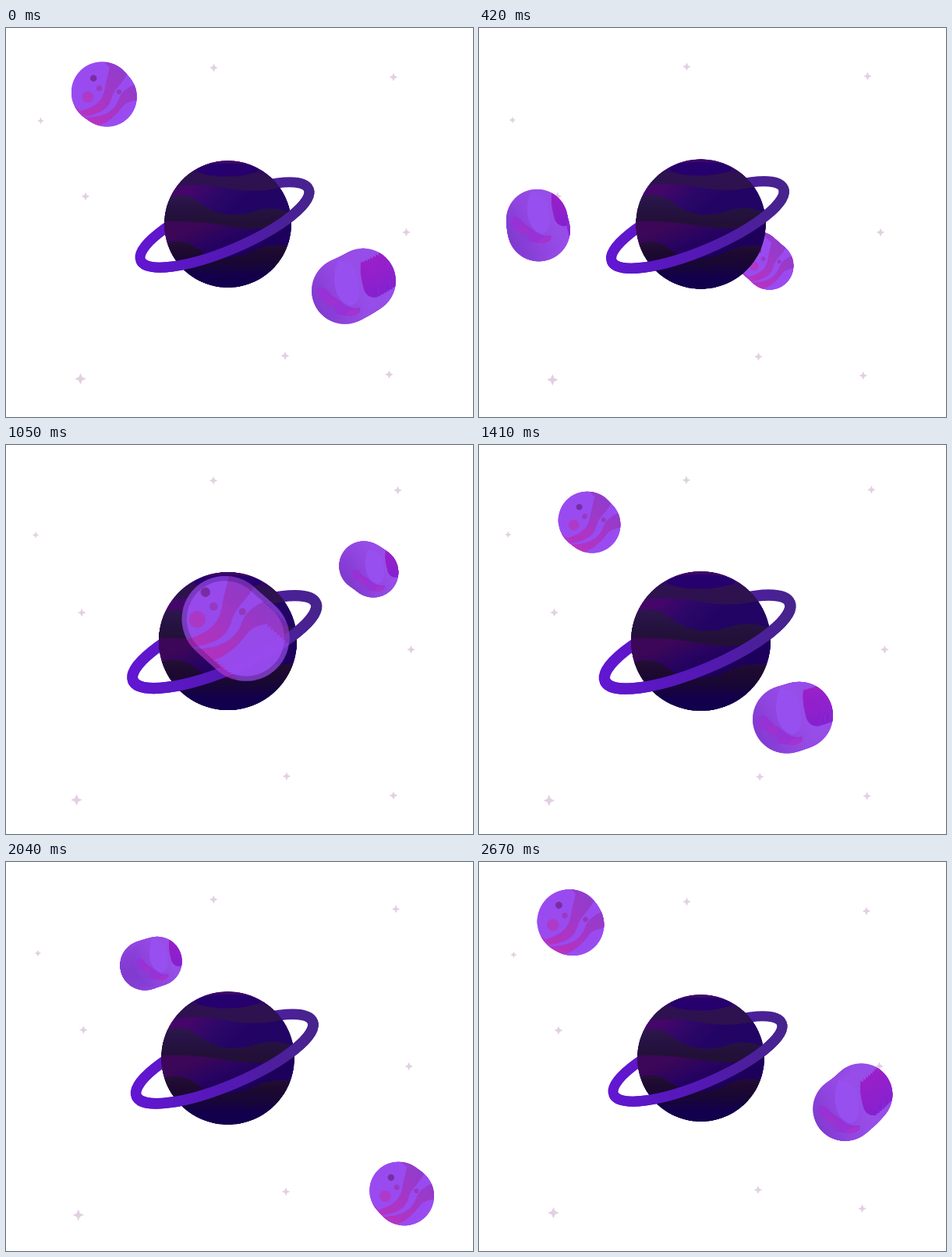
Animation of 599 by 499 pixels, one loop 2.7 s. Source, as an HTML page with a canvas:

```html
<!DOCTYPE html>
<html lang="en">
<head>
<meta charset="utf-8">
<title>Orbiting moons</title>
<style>
  html, body { margin: 0; width: 100%; height: 100%; overflow: hidden; background: #fff; }
  canvas { display: block; width: 599px; height: 499px; }
</style>
</head>
<body>
<canvas id="stage" width="599" height="499"></canvas>
<script>
const W = 599, H = 499, LOOP = 2700, ORBIT = 1350, STEP = 30;
const CX = 284.5, CY = 251.5, RADIUS = 81.9;
const SHUTTER = 21, COPIES = 8;
const RAD = Math.PI / 180;
const ctx = document.getElementById('stage').getContext('2d');

function layer(w, h) {
  const c = document.createElement('canvas');
  c.width = w;
  c.height = h;
  return c.getContext('2d');
}

// Sprite of a unit disc, painted in coordinates from -1 to 1.
function disc(size, paint) {
  const g = layer(size, size);
  g.translate(size / 2, size / 2);
  g.scale(size / 2, size / 2);
  g.beginPath();
  g.arc(0, 0, 0.995, 0, 7);
  g.clip();
  paint(g);
  return g.canvas;
}

function blob(g, color, x, y, rx, ry = rx, turn = 0) {
  g.fillStyle = color;
  g.beginPath();
  g.ellipse(x, y, rx, ry, turn, 0, 7);
  g.fill();
}

function shape(g, fill, path) {
  g.fillStyle = fill;
  g.fill(new Path2D(path));
}

function gradient(g, x0, y0, x1, y1, ...colors) {
  const grad = g.createLinearGradient(x0, y0, x1, y1);
  colors.forEach((c, i) => grad.addColorStop(i / (colors.length - 1), c));
  return grad;
}

function fillFrom(g, y, fill) {
  g.fillStyle = fill;
  g.fillRect(-1, y, 2, 2);
}

const planet = disc(400, g => {
  fillFrom(g, -1, gradient(g, 0, -1, 0, -0.7, '#40086a', '#2c0860'));
  blob(g, '#26006c', 0, -0.85, 0.48, 0.1);
  shape(g, '#2d124f', 'M-1 -.72 Q-.6 -.85 -.4 -.78 Q0 -.68 .4 -.8 Q.6 -.82 1 -.65 V0 H-1Z');
  shape(g, gradient(g, -0.5, -0.62, 0, -0.1, '#45066a', '#2c0868', '#220464'),
    'M-1 -.56 Q-.5 -.66 0 -.56 T1 -.62 V0 H-1Z');
  shape(g, gradient(g, 0, -0.42, 0, 0.02, '#2c164c', '#251240', '#221036'),
    'M-1 -.38 C-.75 -.5 -.6 -.46 -.45 -.34 C-.2 -.14 .1 -.1 .4 -.2 C.65 -.28 .8 -.24 1 -.18 V.1 H-1Z');
  shape(g, gradient(g, -0.2, -0.06, 0, 0.45, '#3c0758', '#2a0462', '#1d005c'),
    'M-1 -.04 Q-.5 -.06 0 .03 T1 0 V1 H-1Z');
  shape(g, gradient(g, 0, 0.25, 0, 1, '#251038', '#1e0a30', '#180736', '#13004c', '#13004e'),
    'M-1 .32 C-.75 .22 -.6 .28 -.45 .4 C-.2 .58 .15 .55 .4 .42 C.6 .32 .8 .32 1 .34 V1 H-1Z');
});

const striped = disc(160, g => {
  fillFrom(g, -1, '#9b4cf0');
  const stripe = gradient(g, -0.7, 0.8, 0.7, -0.7, '#b934c2', '#a638c8', '#923ccc');
  shape(g, stripe, 'M.1 -1.1 C.05 -.75 0 -.65 -.05 -.4 C-.1 -.1 -.15 .3 -.95 .48' +
    ' L-.78 .66 C-.1 .55 .05 .35 .15 .05 C.25 -.3 .45 -.35 .7 -.8 L.6 -1.1Z');
  shape(g, stripe, 'M1.1 -.5 C.75 -.35 .5 -.2 .4 .05 C.25 .5 -.1 .68 -.8 .7' +
    ' L-.4 1 C.1 .85 .3 .6 .5 .35 C.65 .15 .8 .15 1.1 .08Z');
  blob(g, '#7c2da6', -0.45, -0.62, 0.11);
  blob(g, '#9a3bc4', -0.26, -0.29, 0.095);
  blob(g, '#b03ac8', -0.64, 0.01, 0.19);
  blob(g, '#943ab8', 0.4, -0.17, 0.08);
});

const cloudy = disc(160, g => {
  fillFrom(g, -1, gradient(g, -0.9, 0.5, 0.4, -0.2, '#813bd0', '#9146e0', '#984ee8'));
  shape(g, '#9734d6', 'M-.85 -.05 C-.6 -.25 -.5 .1 -.3 .2 C-.1 .3 .1 .6 .45 .5' +
    ' C.5 .7 .2 .8 -.1 .72 C-.5 .7 -.8 .4 -.85 -.05Z');
  blob(g, '#8a3cd6', -0.5, 0.5, 0.3, 0.14, 0.7);
  blob(g, '#a132cf', -0.42, 0.32, 0.17, 0.11, 0.4);
  blob(g, '#a436d0', 0.25, 0.65, 0.22, 0.09, -0.3);
  shape(g, '#9a50f0', 'M-.2 -.9 Q.35 -.9 .4 -.2 Q.5 .3 .2 .45 Q-.1 .4 -.25 .05 Q-.4 -.4 -.2 -.9Z');
  shape(g, gradient(g, 0.4, -0.8, 0.9, 0.3, '#9c20c8', '#8422d2'),
    'M.5 -1 C.42 -.55 .5 -.35 .55 -.1 C.62 .2 .85 .25 1.1 .15 V-1Z');
});

// Smooth periodic curve through [time, angle] keys; one turn per ORBIT.
function curve(keys) {
  const n = keys.length;
  const key = i => {
    const turn = Math.floor(i / n), k = keys[i - turn * n];
    return [k[0] + turn * ORBIT, k[1] + turn * 360];
  };
  const slope = i => {
    const [a, b, c] = [key(i - 1), key(i), key(i + 1)];
    const h0 = b[0] - a[0], h1 = c[0] - b[0];
    return ((b[1] - a[1]) / h0 * h1 + (c[1] - b[1]) / h1 * h0) / (h0 + h1);
  };
  return time => {
    const t = ((time % ORBIT) + ORBIT) % ORBIT;
    let i = 0;
    while (key(i + 1)[0] <= t) i++;
    const [t0, v0] = key(i), [t1, v1] = key(i + 1);
    const h = t1 - t0, u = (t - t0) / h, w = 1 - u;
    return RAD * (v0 * (1 + 2 * u) * w * w + v1 * (3 - 2 * u) * u * u +
      h * u * w * (slope(i) * w - slope(i + 1) * u));
  };
}

const angleA = curve([[0, 20], [60, 30], [420, 102.3], [785, 180], [960, 244.7], [1050, 277.4], [1320, 371.2]]);
const angleB = curve([[0, 47.2], [60, 60.6], [420, 174], [960, 299.8], [1050, 320.4], [1320, 392.6]]);

const moons = [
  {
    sprite: striped,
    pose(t) {
      const a = angleA(t), c = Math.cos(a), s = Math.sin(a);
      return { x: 321 - 207 * c, y: 259 - 184.5 * c, r: 43.3 - 12.6 * s, depth: -s };
    }
  },
  {
    sprite: cloudy,
    pose(t) {
      const a = angleB(t), s = Math.sin(a);
      return { x: 295 + 221 * Math.cos(a), y: 239.5 + 126 * s, r: 38 + 7.5 * Math.sin(a - 10 * RAD), depth: s };
    }
  }
];

// Each star: x, y, size.
const stars = [
  [266.5, 51, 5], [497, 63, 5], [44.5, 119, 4], [102, 216, 5],
  [513.5, 262, 5], [358, 420.5, 5], [491.5, 444.5, 5], [95.5, 450, 6.8]
];

function drawStars(k) {
  ctx.fillStyle = '#e2d0e2';
  for (const [x0, y0, r] of stars) {
    const x = CX + (x0 - CX) * k, y = CY + (y0 - CY) * k;
    ctx.beginPath();
    for (let i = 0; i < 8; i++) {
      const d = r * (i % 2 ? 0.46 : 1.08), a = i * Math.PI / 4;
      ctx.lineTo(x + d * Math.cos(a), y + d * Math.sin(a));
    }
    ctx.fill();
  }
}

function drawRing(s, from, to) {
  ctx.save();
  ctx.translate(CX, CY);
  ctx.scale(s, s);
  ctx.strokeStyle = gradient(ctx, -115, 0, 112, 0, '#6216d2', '#5418b4', '#46248a');
  ctx.lineWidth = 13;
  ctx.beginPath();
  ctx.ellipse(-4, 1, 117, 32.5, -23 * RAD, from, to);
  ctx.stroke();
  ctx.restore();
}

// Poses while the shutter is open, the latest one last.
function trail(moon, t) {
  return Array.from({ length: COPIES }, (_, i) => moon.pose(t + SHUTTER * (i / (COPIES - 1) - 0.5)));
}

const smear = layer(W, H);

// A sharp disc on its own trail, with a rim that lets the planet through.
function drawMoon(moon, t) {
  const poses = trail(moon, t);
  const core = new Path2D();
  smear.clearRect(0, 0, W, H);
  for (const { x, y, r } of poses) {
    smear.drawImage(moon.sprite, x - r, y - r, 2 * r, 2 * r);
    core.moveTo(x + r * 0.88, y);
    core.arc(x, y, r * 0.88, 0, 2 * Math.PI);
  }
  ctx.save();
  ctx.globalAlpha = 0.7;
  ctx.drawImage(smear.canvas, 0, 0);
  ctx.clip(core);
  ctx.globalAlpha = 0.9;
  ctx.drawImage(smear.canvas, 0, 0);
  ctx.restore();
}

// Over the empty sky the rim is solid.
function drawUnder(moon, t) {
  for (const { x, y, r } of trail(moon, t).reverse()) {
    ctx.drawImage(moon.sprite, x - r, y - r, 2 * r, 2 * r);
  }
}

function draw(t) {
  const pulse = (1 - Math.cos(2 * Math.PI * t / LOOP)) / 2;
  const s = 1 + 0.1 * pulse, r = RADIUS * s;
  const depth = m => m.pose(t).depth;
  const order = [...moons].sort((a, b) => depth(a) - depth(b));

  ctx.globalCompositeOperation = 'source-over';
  ctx.clearRect(0, 0, W, H);
  order.filter(m => depth(m) < 0).forEach(m => drawMoon(m, t));
  drawRing(s, 0, 2 * Math.PI);
  ctx.drawImage(planet, CX - r, CY - r, 2 * r, 2 * r);
  drawRing(s, 0, Math.PI);
  order.filter(m => depth(m) >= 0).forEach(m => drawMoon(m, t));

  ctx.globalCompositeOperation = 'destination-over';
  order.reverse().forEach(m => drawUnder(m, t));
  drawStars(1 + 0.03 * pulse);
}

function tick() {
  const t = performance.now() % LOOP;
  draw(Math.floor(t / STEP) * STEP);
  requestAnimationFrame(tick);
}
tick();
</script>
</body>
</html>
```
